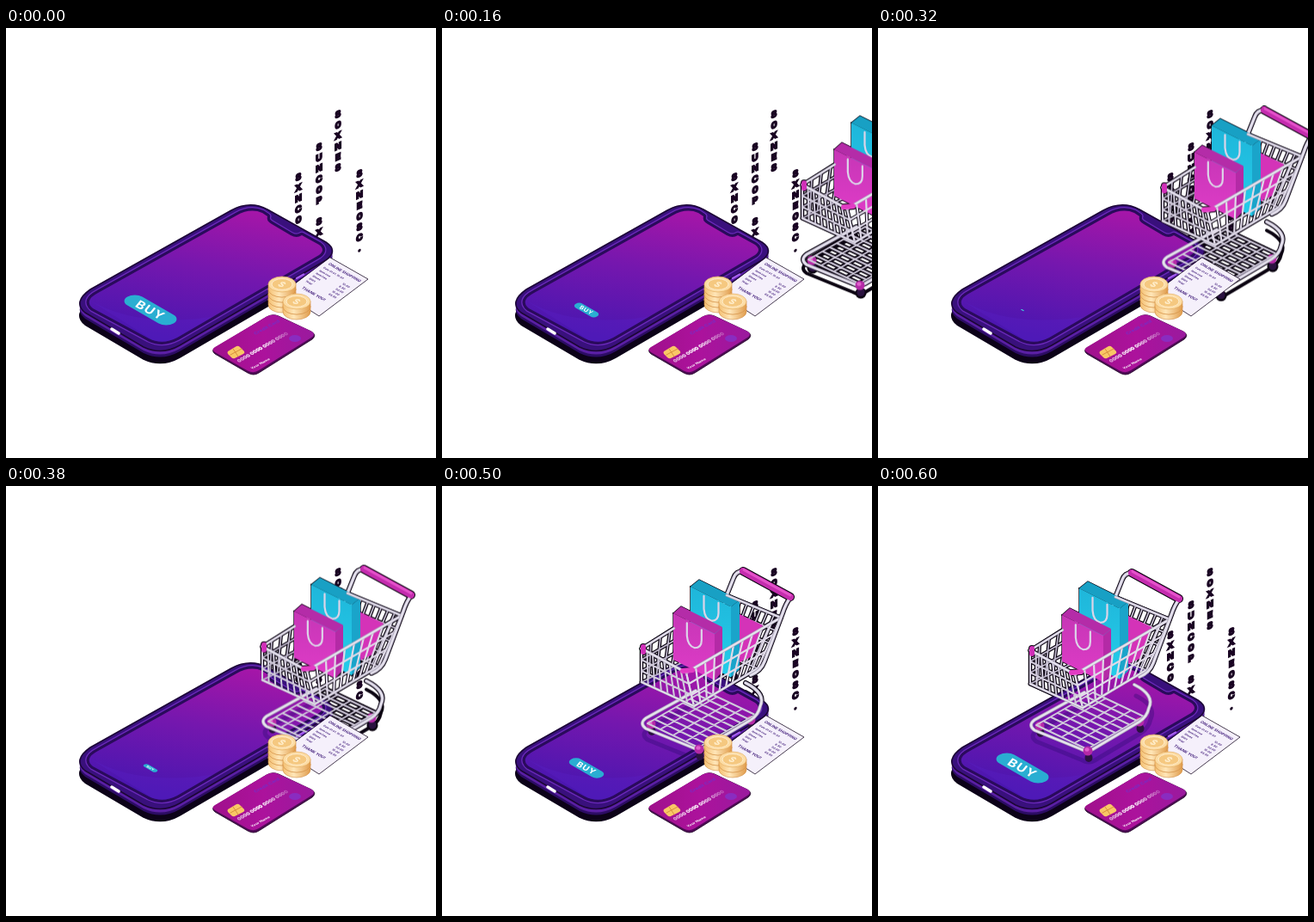
An HTML page that plays this animation: 500 by 500 pixels, repeating every 1020 ms.

```html
<!DOCTYPE html>
<html lang="en">
<head>
<meta charset="utf-8">
<title>Online shopping</title>
<style>
  html, body { margin: 0; width: 100%; height: 100%; overflow: hidden; background: #fff; }
  svg { display: block; width: 100vw; height: 100vh; }
  text { font-family: Inter, Arial, sans-serif; font-weight: 700; }
  path, polyline { stroke-linecap: round; stroke-linejoin: round; }
</style>
</head>
<body>
<svg viewBox="0 0 500 500">
  <defs>
    <linearGradient id="screenFill" gradientUnits="userSpaceOnUse" x1="250" y1="208" x2="220" y2="368">
      <stop offset="0" stop-color="#a416a8"/>
      <stop offset=".45" stop-color="#7517ae"/>
      <stop offset="1" stop-color="#4816b0"/>
    </linearGradient>
    <linearGradient id="cardFill" x1="0" y1="0" x2="1" y2="0">
      <stop offset="0" stop-color="#a0108c"/>
      <stop offset=".5" stop-color="#ac129c"/>
      <stop offset="1" stop-color="#9a1a9e"/>
    </linearGradient>
    <linearGradient id="numberFill">
      <stop offset="0" stop-color="#dc9ad6"/>
      <stop offset=".45" stop-color="#fff"/>
      <stop offset="1" stop-color="#b84cb4"/>
    </linearGradient>
    <linearGradient id="pinkFill" x1="0" y1="0" x2="0" y2="1">
      <stop offset="0" stop-color="#c636b6"/>
      <stop offset="1" stop-color="#e03cc8"/>
    </linearGradient>
    <linearGradient id="blueFill" x1="0" y1="0" x2="0" y2="1">
      <stop offset="0" stop-color="#1fb6da"/>
      <stop offset="1" stop-color="#24cdea"/>
    </linearGradient>
    <linearGradient id="coinSide">
      <stop offset="0" stop-color="#f4c072"/>
      <stop offset=".4" stop-color="#ffe6b8"/>
      <stop offset="1" stop-color="#e09c4c"/>
    </linearGradient>
    <path id="slab" d="M98 304 L262 212 Q284 200 304 211 L372 249 Q387 259 372 270 L202 369 Q181 381 160 371 L92 331 Q77 319 98 304Z"/>
    <path id="glass" d="M107 308 L268 218 Q284 209 298 215 L304 219 Q302 224 309 228 L331 241 Q338 245 344 241 L364 252 Q372 258 364 264 L199 360 Q182 369 166 361 L101 326 Q90 317 107 308Z"/>
    <clipPath id="glassClip"><use href="#glass"/></clipPath>
  </defs>

  <g id="glyphs" fill="#190322" font-size="10"></g>
  <g class="ride" id="fringe"></g>

  <!-- phone -->
  <use href="#slab" y="14" fill="#0c0218" stroke="#0c0218" stroke-width="1.6"/>
  <use href="#slab" y="7" fill="#2c0c64"/>
  <use href="#slab" y="4" fill="#5a1fa4"/>
  <use href="#slab" fill="#39107c" stroke="#1c0636" stroke-width="1.6"/>
  <use href="#glass" fill="#6a28ba" stroke="#6a28ba" stroke-width="9"/>
  <use href="#glass" fill="#2a0a5c" stroke="#2a0a5c" stroke-width="6.500"/>
  <use href="#glass" fill="url(#screenFill)"/>
  <g clip-path="url(#glassClip)">
    <path d="M90 312 Q150 352 250 334 L190 375 Z" fill="#5a22c4" opacity=".35"/>
    <g class="ride" id="shade"></g>
  </g>
  <path d="M123 350 L131 355" stroke="#fff" stroke-width="3.400"/>
  <path d="M338 291 L346 286.500" stroke="#a45cf0" stroke-width="2.500"/>

  <g transform="translate(168 328)">
    <g id="buy">
      <rect transform="matrix(.866 .5 -.866 .5 0 0)" x="-31" y="-10" width="62" height="20" rx="10" fill="#2aaed2"/>
      <text transform="matrix(.87 .47 -.55 .68 0 0)" y="5.600" font-size="15.500" letter-spacing="1" text-anchor="middle" fill="#fff">BUY</text>
    </g>
  </g>

  <g class="ride" id="cart"></g>

  <!-- card -->
  <path d="M243 372 L303 336 Q310 332 317 335 L355 353 Q362 357 356 362 L294 401 Q288 405 281 401 L243 379 Q238 375 243 372Z" fill="#4f0a56" stroke="#1c0322" stroke-width=".8"/>
  <path d="M243 371 L303 335.500 Q310 332 317 335 L355 352.500 Q361 356 355 360 L294 398 Q288 402 281 398.500 L243 377 Q238 374 243 371Z" fill="url(#cardFill)"/>
  <path d="M258 376 L268 370 Q270 369 272 371 L277 376 Q278 378 276 379 L266 384 Q264 385 262 383 L258 379 Q257 377 258 376Z" fill="#f9c766"/>
  <path d="M261 380 L274 373 M264 373 L270 382" stroke="#d48a3a" stroke-width=".9" fill="none"/>
  <text transform="matrix(.866 -.5 .7 .6 271 389)" font-size="5.800" fill="url(#numberFill)" stroke="url(#numberFill)" stroke-width=".4">0000 0000 0000 0000</text>
  <text transform="matrix(.866 -.47 .6 .6 286 397)" font-size="4.600" fill="#fff">Your Name</text>
  <text transform="matrix(.866 -.47 .6 .6 290 357)" font-size="6" fill="#7a2cc4">Credit Card</text>
  <ellipse cx="336" cy="361" rx="7" ry="4" fill="#8a2cc0"/>

  <!-- receipt -->
  <path d="M377 267 L421 292 L364 335 L322 308Z" fill="#f5f0fb" stroke="#1d1028" stroke-width=".8"/>
  <g id="receipt" fill="#4a2780" transform="matrix(.866 .49 -.8 .6 377 267)"></g>

  <g id="coins"></g>
</svg>

<script>
const $ = id => document.getElementById(id);

function add(parent, tag, attrs, text) {
  const el = document.createElementNS('http://www.w3.org/2000/svg', tag);
  for (const k in attrs) el.setAttribute(k, attrs[k]);
  if (text) el.textContent = text;
  parent.append(el);
  return el;
}

// columns of letters: x, first y, then the letters
[[340, 173, '8XNC0'], [364, 138, '8UNC0P 8X'], [386, 100, '80XNE8'], [411, 169, '8XNE08C.']]
  .forEach(([x, y, word]) => [...word].forEach((ch, i) =>
    add($('glyphs'), 'text', {
      transform: `translate(${x} ${y + i * 12.4}) skewY(-24)`,
      y: 3.8, 'text-anchor': 'middle', stroke: '#190322', 'stroke-width': 1.8
    }, ch)));

// receipt lines
const note = (x, y, size, text) => add($('receipt'), 'text', { x, y, 'font-size': size }, text);
note(5, 9, 4.6, 'ONLINE SHOPPING');
note(5, 16, 3.2, 'Date 01.01. 10:30');
['Item one', 'Item two', 'Shoes', 'Shirt', 'Total'].forEach((s, i) => {
  note(5, 22 + i * 5, 3.4, s);
  note(36, 22 + i * 5, 3.4, ['12.00', '8.50', '30.00', '15.00', '65.50'][i]);
});
note(9, 52, 4.8, 'THANK YOU!');

// coins
function stack(x, y, n) {
  const g = $('coins'), rx = 16, ry = 9, h = 6;
  for (let i = n - 1; i >= 0; i--) {
    const top = y + i * h;
    add(g, 'path', {
      d: `M${x - rx} ${top} v${h} a${rx} ${ry} 0 0 0 ${2 * rx} 0 v${-h}Z`,
      fill: 'url(#coinSide)', stroke: '#d08c42', 'stroke-width': .6
    });
    add(g, 'ellipse', { cx: x, cy: top, rx, ry, fill: '#fcdca4', stroke: '#e6b068', 'stroke-width': .7 });
  }
  add(g, 'ellipse', { cx: x, cy: y, rx: 12, ry: 6.4, fill: '#f5c880', stroke: '#ffeccb', 'stroke-width': 1 });
  add(g, 'text', {
    transform: `translate(${x} ${y}) matrix(.866 .4 -.7 .6 0 0)`, y: 4,
    'font-size': 11, 'text-anchor': 'middle', fill: '#ffedca'
  }, '$');
}
stack(321, 298, 4);
stack(338, 318, 2);

// cart
const L = [177, 191], F = [229, 219], R = [339, 155], K = [276, 129];
const l = [177, 230], f = [238, 258], r = [312, 214], k = [256, 192];
const mix = (a, b, t) => [a[0] + (b[0] - a[0]) * t, a[1] + (b[1] - a[1]) * t];
const seg = (a, b) => `M${a}L${b}`;

function mesh(a, b, c, d, cols, rows) {
  let p = '';
  for (let i = 0; i <= cols; i++) p += seg(mix(a, b, i / cols), mix(d, c, i / cols));
  for (let j = 0; j <= rows; j++) p += seg(mix(a, d, j / rows), mix(b, c, j / rows));
  return p;
}

function line(d, width, color = '#d9d4e2', edge = 2) {
  add($('fringe'), 'path', { d, fill: 'none', stroke: '#0c0512', 'stroke-width': width + edge });
  add($('cart'), 'path', { d, fill: 'none', stroke: color, 'stroke-width': width });
}

function tube(d, width) {
  line(d, width, '#aaa4b8');
  add($('cart'), 'path', { d, fill: 'none', stroke: '#e6e2ee', 'stroke-width': width * .6 });
}

function face(points, fill) {
  add($('fringe'), 'polygon', { points, fill: '#0c0512', stroke: '#0c0512', 'stroke-width': 1.4 });
  add($('cart'), 'polygon', { points, fill });
}

function bag(x, y, w, side, h, front, dark, inner) {
  const fall = w * .5;
  face([x, y, x + side, y - 8, x + w + side, y + fall - 8, x + w, y + fall], inner);
  face([x + w, y + fall, x + w + side, y + fall - 8, x + w + side, y + h + 14, x + w, y + h + fall], dark);
  face([x, y, x + w, y + fall, x + w, y + h + fall, x, y + h], front);
  const hx = x + w * .33, hy = y + w * .38;
  add($('cart'), 'path', {
    d: `M${hx} ${hy - 7} v15 q1 12 9 14 q8 0 8 -9 v-12`,
    fill: 'none', stroke: '#dcd4e8', 'stroke-width': 2.2
  });
}

function wheel(x, y) {
  add($('fringe'), 'ellipse', { cx: x + 1, cy: y + 9, rx: 6.5, ry: 6.5, fill: '#0c0512' });
  add($('cart'), 'ellipse', { cx: x + 1, cy: y + 8, rx: 4.5, ry: 5, fill: '#2a1240' });
  add($('cart'), 'ellipse', { cx: x, cy: y, rx: 5.5, ry: 5.5, fill: '#b42aa6' });
  add($('cart'), 'ellipse', { cx: x - 1, cy: y - 1.5, rx: 2.6, ry: 2.2, fill: '#e060cc' });
}

const rack = 'M298 231 Q322 243 315 258 Q313 268 304 274 L250 306 Q243 310 236 306 L182 284 Q174 278 182 272 L240 240';
add($('fringe'), 'path', { d: rack, fill: 'none', stroke: '#0c0512', 'stroke-width': 4, transform: 'translate(0 10)' });
add($('shade'), 'path', { d: rack, fill: 'none', stroke: '#2c0a70', 'stroke-width': 5, opacity: .35, transform: 'translate(2 13)' });

wheel(188, 279);
wheel(304, 274);
line(mesh([184, 278], [243, 306], [309, 268], [250, 240], 4, 8), 2, '#cfc9da', 3.6);
tube(rack, 4);
wheel(244, 308);

line(mesh(L, K, k, l, 9, 3), 1.7, '#bdb6ca', 2.4);
line(mesh(K, R, r, k, 8, 4), 1.7, '#cbc5d6', 2.4);
tube('M297 101 Q287 100 284 109 L276 129', 4);
face([289, 150, 318, 164, 306, 200, 289, 208], '#d433b8');
bag(234, 119, 47, 10, 82, 'url(#blueFill)', '#1aa4ca', '#18a0c4');
bag(214, 150, 48, 9, 54, 'url(#pinkFill)', '#b42aa6', '#b42ca8');
line(mesh(L, F, f, l, 8, 3), 2, '#d0cada', 2.4);
line(mesh(F, R, r, f, 10, 3), 2.2, '#e0dae8');
tube(seg(L, F) + 'L' + R, 3.6);
tube(seg(K, R), 3);
tube(seg(L, mix(L, K, .38)), 3);
tube(seg(l, f) + 'L' + r, 3);
tube('M350 132 Q345 138 341 150 L320 206 Q316 217 304 222', 4);
line('M295 101 L350 131', 8, '#c42cae');
add($('cart'), 'path', { d: 'M296 99.500 L350 129', stroke: '#e452ca', 'stroke-width': 3 });
line('M179 189 v6', 6, '#d030b8');
line('M225 217 L236 216', 6, '#e23cc4');

// motion: 20 ms steps, then a rest until the loop ends
const loop = 1020, stop = 600 / loop;
const forever = { duration: loop, iterations: Infinity };
const rides = [...document.querySelectorAll('.ride')].map(el => el.animate([
  { transform: 'translate(330px, -12px)', easing: 'steps(30)' },
  { transform: 'translate(0px, 0px)', offset: stop },
  { transform: 'translate(0px, 0px)' }
], forever));
const pulse = $('buy').animate([
  { transform: 'scale(1)', easing: 'steps(15)' },
  { transform: 'scale(0)', offset: stop / 2, easing: 'steps(15)' },
  { transform: 'scale(1)', offset: stop },
  { transform: 'scale(1)' }
], forever);
const begin = document.timeline.currentTime || 0;
[...rides, pulse].forEach(a => a.startTime = begin);
</script>
</body>
</html>
```
